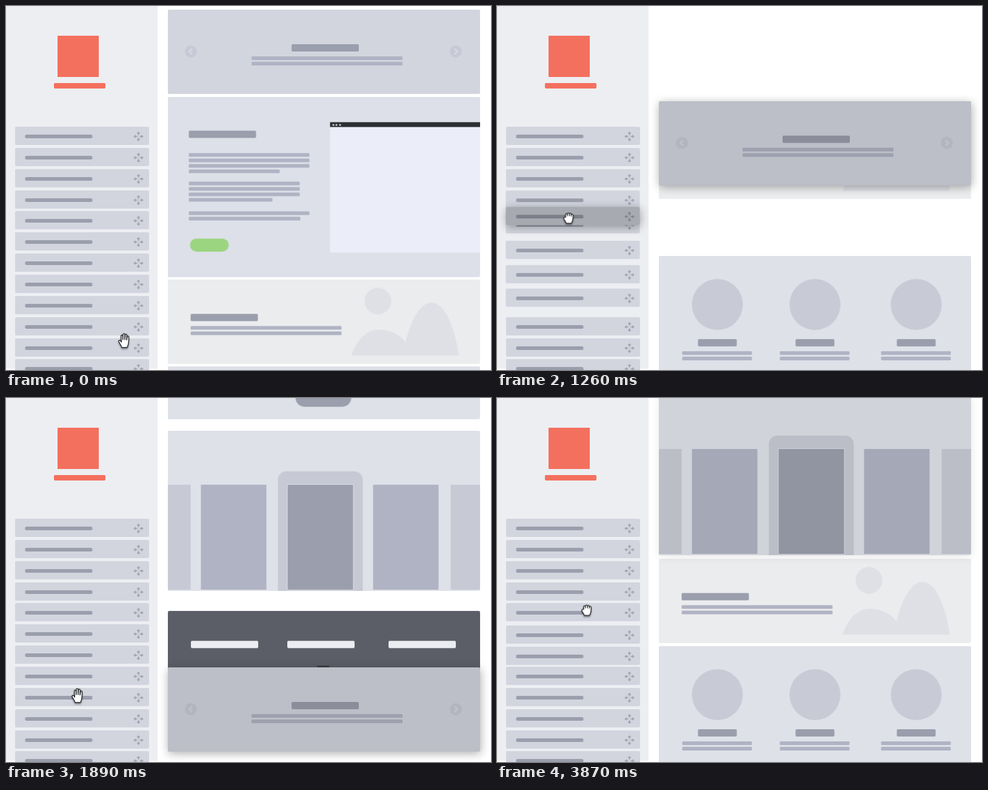
Animation, 800 px wide and 600 px high, one loop 4410 ms. Source, as an HTML page:

```html
<!DOCTYPE html>
<html lang="en">
<head>
<meta charset="utf-8">
<title>Drag to reorder</title>
<style>
  html, body { margin: 0; width: 100%; height: 100%; overflow: hidden; background: #fff; }
  #stage { position: relative; width: 800px; height: 600px; overflow: hidden; }
  #stage div, #stage svg { position: absolute; }
  svg { overflow: visible; }
  .shade { inset: 0; border-radius: 2px; opacity: 0; box-shadow: 1px 3px 15px rgba(0,0,0,.32); }
</style>
</head>
<body>
<div id="stage"></div>
<script>
const LOOP = 4410, STEP = 30;
const GRAB = 1045, REGRAB = 3190;   // the two drags begin here
const SINE = 'cubic-bezier(.365,0,.635,1)';
const TAIL = 'cubic-bezier(.3,0,.1,1)';
const HEAD = '#9b9eac', LINE = '#b0b3c3', PALE = '#c7c9d4', SOFT = '#dee1e8', RED = '#f4705e';
const stage = document.getElementById('stage');
const anims = [];

// ---- building blocks ----
function box(parent, x, y, w, h, color, radius = 0) {
  const el = document.createElement('div');
  el.style.cssText = `left:${x}px;top:${y}px;width:${w}px;height:${h}px;` +
    `background:${color};border-radius:${typeof radius === 'number' ? radius + 'px' : radius}`;
  parent.append(el);
  return el;
}
function draw(parent, x, y, markup) {
  parent.insertAdjacentHTML('beforeend',
    `<svg width="1" height="1" style="left:${x}px;top:${y}px">${markup}</svg>`);
  return parent.lastElementChild;
}
const disc = (p, x, y, r, color) => box(p, x - r, y - r, 2 * r, 2 * r, color, r);
const title = (p, x, y, w = 111) => box(p, x, y, w, 12, HEAD, 2);
const lines = (p, x, y, ...widths) =>
  widths.forEach((w, i) => box(p, x, y + i * 9, w, 6, LINE, 1.5));
function shade(parent, alpha) {
  const el = document.createElement('div');
  el.className = 'shade';
  el.style.background = `rgba(0,0,0,${alpha})`;
  parent.append(el);
  return el;
}

// ---- timing: each move is [start, duration, target, easing] ----
function play(el, make, from, moves) {
  let v = from;
  const keys = [{ offset: 0, ...make(v) }];
  for (const [start, length, to, easing = SINE] of moves) {
    keys.push({ offset: start / LOOP, ...make(v), easing },
              { offset: (start + length) / LOOP, ...make(to) });
    v = to;
  }
  keys.push({ offset: 1, ...make(v) });
  const a = el.animate(keys, { duration: LOOP, fill: 'both' });
  a.pause();
  anims.push(a);
}
const travel = (el, at, ...moves) =>
  play(el, ([x, y]) => ({ transform: `translate(${x}px,${y}px)` }), at, moves);
const slide = (el, x, y, ...moves) =>
  play(el, v => ({ transform: `translate(${x}px,${v}px)` }), y, moves);
const fade = (el, v, ...moves) => play(el, opacity => ({ opacity }), v, moves);

// ---- page sections ----
// out: delay and length of the move in the first drag; back: length in the second
function section(h, color, dx, out, back, space = h) {
  const el = box(stage, 267, 0, 515, h, color, 2);
  return { el, dx, out, back, space, tops: [] };
}
const about = section(297, '#dde0e8', -.5, [15, 355], 300);
const picture = section(139, '#ebecee', -.5, [30, 475], 300);
const team = section(263, SOFT, -.5, [76, 446], 258, 268);
const footer = section(124, '#5c5e67', 0, [115, 1035, TAIL], 310);
const gallery = section(264, SOFT, -.5, [75, 910, TAIL], 317);
const hero = section(139, '#d2d5de', 0, [23, 481], 313, 139.5);

title(about.el, 35, 56);
lines(about.el, 35, 93, 199, 199, 199, 150);
lines(about.el, 35, 140, 183, 183, 183, 138);
lines(about.el, 35, 189, 199, 184);
box(about.el, 37, 234, 64, 21, '#9bd580', 10.5);
box(about.el, 268, 42, 247, 215, '#ebeef8');
box(about.el, 268, 42, 247, 8, '#2d2e34');
for (let i = 0; i < 3; i++) disc(about.el, 273 + i * 5.5, 46.5, 1.5, '#e8eaf0');

title(picture.el, 38, 57);
lines(picture.el, 38, 77, 249, 249);
disc(picture.el, 347, 36, 22, '#dfe0e6');
draw(picture.el, .5, 0, `<path fill="#dfe0e6" d="M302.5 125.5C312 98 328 83 347 83
  C366 83 383 91 391.5 104C400 68 416 38.5 434.5 38.5C455 38.5 472 75 479.5 125.5Z"/>`);

for (const x of [97, 258, 425]) {
  disc(team.el, x, 80, 42, '#c8cad5');
  title(team.el, x - 32, 137, 64);
  lines(team.el, x - 58, 157, 115, 115);
}
box(team.el, 211, 213, 92, 30, HEAD, 15);

for (const x of [38, 197, 364]) box(footer.el, x, 49, 111, 12, '#ecedf1', 2);
box(footer.el, 246, 90, 20, 20, '#3b3d45');

for (const [x, w, color] of [[0, 38, PALE], [467, 48, PALE], [55, 108, LINE], [339, 108, LINE]])
  box(gallery.el, x, 89, w, 173, color);
box(gallery.el, 182, 67, 140, 197, PALE, '14px 14px 0 0');
box(gallery.el, 197, 88, 110, 175, SOFT);
box(gallery.el, 198, 89, 108, 173, HEAD);
fade(shade(gallery.el, .2), 0, [2670, 180, 1], [3720, 150, .3]);

title(hero.el, 204, 57);
lines(hero.el, 138, 77, 249, 249);
for (const [x, side] of [[38, 1], [475, -1]]) {
  disc(hero.el, x, 69, 10, '#c7cad6');
  draw(hero.el, x, 69, `<path d="M${2 * side}-4.5L${-2.5 * side} 0L${2 * side} 4.5"
    fill="none" stroke="#d6d9e2" stroke-width="2.6"/>`);
}
fade(shade(hero.el, .1), 0, [690, 210, 1], [1900, 220, 0]);

// Lay out the page once per order, so that `fixed` has its top at y.
function stack(order, fixed, y, gap) {
  let top = 0;
  const tops = order.map(s => { const t = top; top += s.space + gap; return t; });
  const shift = y - tops[order.indexOf(fixed)];
  order.forEach((s, i) => s.tops.push(tops[i] + shift));
}
const first = [hero, about, picture, team, gallery, footer];
stack(first, hero, 6, 4);
stack([about, picture, team, gallery, footer, hero], hero, 444, 5.5);
stack([about, gallery, picture, team, footer, hero], gallery, -5, 5.5);
for (const { el, dx, tops, out: [delay, length, ease], back } of first)
  slide(el, dx, tops[0],
    [GRAB + delay, length, tops[1], ease], [REGRAB, back, tops[2]]);

// ---- sidebar ----
box(stage, 0, 0, 250, 598, '#edeef2');
box(stage, 85, 49, 68, 68, RED);
box(stage, 79, 127, 85, 9, RED, 2);

const ARROWS = [0, 90, 180, 270].map(a =>
  `<path transform="rotate(${a})" fill="${HEAD}" d="M0-8L2.9-4.8H.8V-2H-.8V-4.8H-2.9Z"/>`).join('');
const slot = i => Math.round(199 + i * 34.85);
const FROM = 2, TO = 8, PICK = 7;   // dragged first, its new slot, dragged second

for (let i = 0; i < 12; i++) {
  const row = box(stage, 14, 0, 221, 30, '#d2d5de', 2);
  box(row, 17, 13, 111, 6, HEAD, 2.5);
  draw(row, 204, 16, ARROWS);

  const moves = [];
  if (i === FROM) moves.push([GRAB, 585, slot(TO)]);
  else if (i > FROM && i <= TO) moves.push([GRAB, 150 + 77 * (i - FROM - 1), slot(i - 1)]);
  if (i === PICK) moves.push([REGRAB, 493, slot(i - 3)]);
  else if (i === PICK - 1 || i === PICK - 2)
    moves.push([REGRAB + 200 * (PICK - 1 - i), 230, slot(i) + 2]);
  slide(row, .5, slot(i), ...moves);

  if (i === FROM || i === PICK) {
    const [lift, drop] = i === FROM ? [690, 1640] : [2670, 3660];
    row.style.zIndex = i === FROM ? 2 : 1;
    fade(shade(row, .2), 0, [lift, 180, 1], [drop, 120, 0]);
  }
}

// ---- hand cursor ----
const hand = draw(stage, 0, 0, `
  <g fill="#fff" stroke="#25262a" stroke-width="1.4" stroke-linejoin="round" stroke-linecap="round">
    <path d="M-4 11C-4.5 8-8 4-9 1C-9.3-1-7.3-1.6-6 0L-4.7 2L-5.2-8C-5.2-10-2.6-10-2.5-8
      L-2.2-2L-2-10.5C-1.9-12.6 .8-12.6 .9-10.5L1-2L1.6-9.8C1.8-11.6 4.3-11.5 4.3-9.6
      L4-1.5L5-7C5.4-8.7 7.6-8.3 7.5-6.5C7.4 0 8 5 4.7 11Z"/>
    <path d="M-4 9C-4.5 6-7.5 4-8 1C-8.2-1-6.5-2-5-1L-5.2-5C-5.2-7.3-2.6-7.5-2.2-6
      C-2-8.7 .9-8.7 1.2-6.5C1.8-8.2 4.2-7.7 4.3-5.5C5.2-6.8 7.5-6 7.4-3.8
      C7.3 1 7.5 4 4.5 9ZM-2.2-6V-3.5M1.2-6.5V-3.5M4.3-5.5V-3"/>
  </g>`);
hand.style.zIndex = 3;
hand.style.filter = 'drop-shadow(0 2px 1.5px rgba(0,0,0,.4))';
const [open, closed] = hand.querySelectorAll('path');
fade(open, 1, [720, 0, 0], [1680, 0, 1], [2700, 0, 0]);
fade(closed, 0, [720, 0, 1], [1680, 0, 0], [2700, 0, 1]);
travel(hand, [195, 552],
  [120, 480, [118, 288]],
  [GRAB, 585, [118.5, 494]],
  [1650, 60, [118, 491]],
  [2190, 480, [148, 425.5]],
  [REGRAB, 430, [148, 349.5]]);

// ---- clock ----
const begin = performance.now();
function tick() {
  const t = (performance.now() - begin) % LOOP;
  const now = Math.floor(t / STEP) * STEP;
  for (const a of anims) a.currentTime = now;
  requestAnimationFrame(tick);
}
tick();
</script>
</body>
</html>
```
